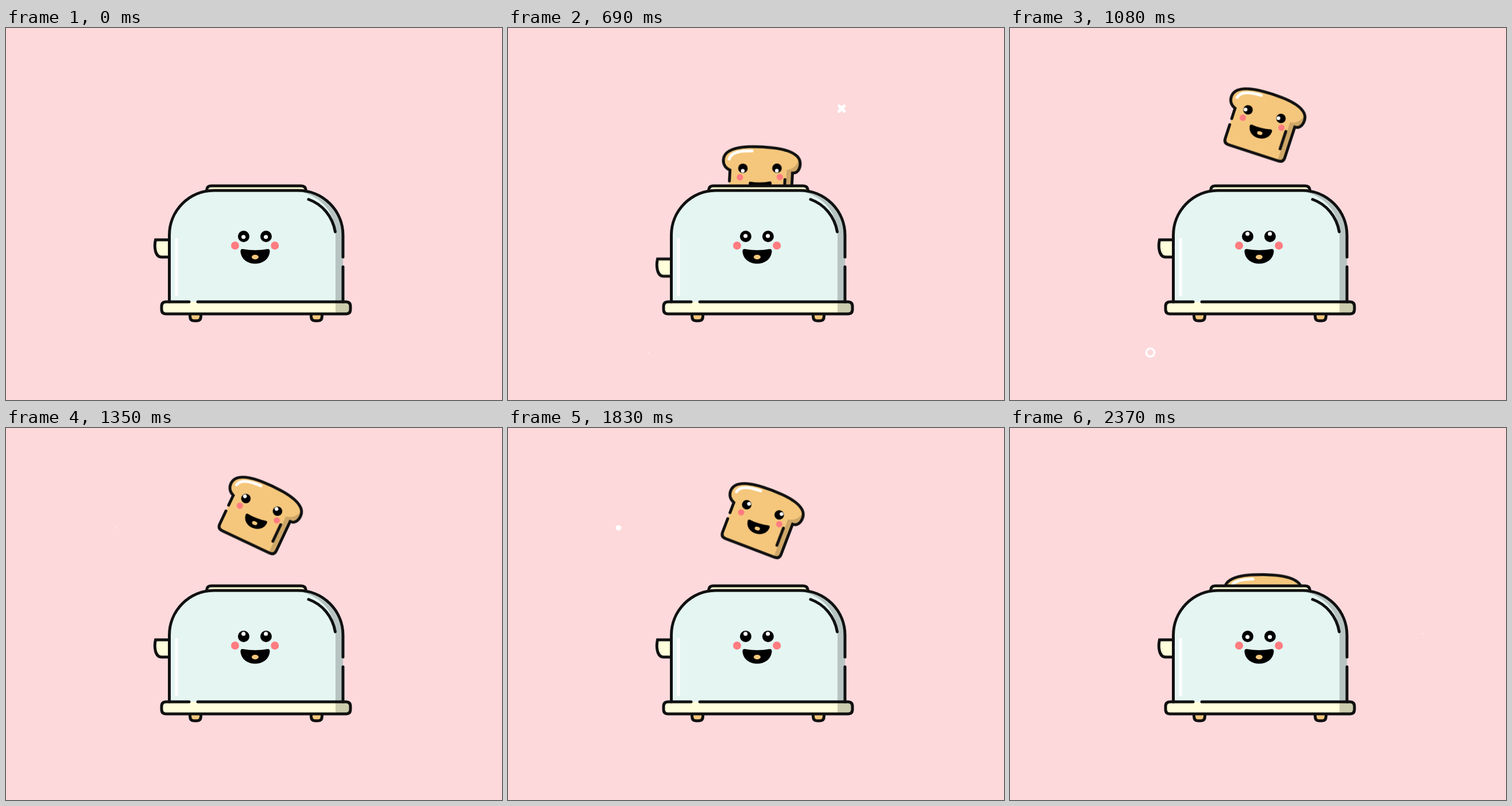
These frames come from a looping animation (864 px wide and 648 px high, 2.4 s). An HTML page:

```html
<!DOCTYPE html>
<html lang="en">
<head>
<meta charset="utf-8">
<title>Toaster</title>
<style>
  html, body { margin: 0; width: 100%; height: 100%; overflow: hidden; background: #fdd9dc; }
  svg { display: block; width: 100%; height: 100%; }
  .line { stroke: #111; stroke-width: 5; stroke-linecap: round; }
  .open { fill: none; }
  .cream { fill: #ffffdb; }
  .crust { fill: #f5c77c; }
  .steel { fill: #e4f5f2; }
  .blush { fill: #ff7c80; }
  .shine { fill: none; stroke: #fff; stroke-width: 5; stroke-linecap: round; }
  .white { fill: #fff; }
</style>
</head>
<body>
<svg viewBox="0 0 864 648">
  <defs>
    <path id="bread" d="M-54.5 8V-11C-63 -14 -67 -21 -67 -28C-67 -46 -45 -54.5 0 -54.5C45 -54.5 67 -46 67 -28C67 -18 62 -12 54.5 -12V44Q54.5 53 45.5 53H-45.5Q-54.5 53 -54.5 44V19"/>
    <clipPath id="crumb"><use href="#bread"/></clipPath>
    <g id="mouth">
      <path d="M-22 -12Q0 -8 22 -12Q26 -12 25.5 -7C24 6 13 13.5 0 13.5C-13 13.5 -24 6 -25.5 -7Q-26 -12 -22 -12Z"/>
      <ellipse class="crust" cy="2" rx="6" ry="4"/>
    </g>
    <path id="foot" class="line crust" d="M320.5 499v3q0 8 7 8h5q7 0 7 -8v-3"/>
  </defs>

  <rect width="864" height="648" fill="#fdd9dc"/>

  <g transform="translate(440.5 0)"><g id="lift"><g id="tilt">
    <use href="#bread" class="crust"/>
    <path clip-path="url(#crumb)" fill-opacity=".16" d="M66 -42C62 -26 56 -19 44 -17V53H70V-42Z"/>
    <use href="#bread" class="line open"/>
    <path class="line" d="M42 0V32"/>
    <path class="shine" d="M-57 -30C-55 -40 -42 -46 -18 -46.5"/>
    <circle class="blush" cx="-36.5" cy=".5" r="5.5"/>
    <circle class="blush" cx="32.8" cy="-3.8" r="5.5"/>
    <g transform="translate(-32.2 -15.3)"><circle r="8.3"/><circle class="white glint" cx="4.4" r="3.3"/></g>
    <g transform="translate(27 -18.8)"><circle r="8.3"/><circle class="white glint" cx="4.4" r="3.3"/></g>
    <use href="#mouth" transform="translate(-.3 15.3) rotate(-4) scale(.78)"/>
  </g></g></g>

  <path id="lever" class="line cream" d="M286 369H260.5C258 380 259 399 271 399H286"/>
  <path class="line cream" d="M349.5 283Q350 275 357 275H514Q522 275 522.5 283"/>
  <use href="#foot"/>
  <use href="#foot" x="211"/>

  <path class="steel" d="M284.5 477V361A78 78 0 0 1 362 283H509A78 78 0 0 1 587 361V477Z"/>
  <path fill-opacity=".2" d="M500 283C545 288 574 318 574 361V477H587V361A78 78 0 0 0 509 283Z"/>
  <rect class="cream" x="271" y="477" width="329" height="21" rx="8"/>
  <path fill-opacity=".2" d="M574 477H592q8 0 8 8v5q0 8 -8 8H574Z"/>
  <path class="line open" d="M284.5 477V361A78 78 0 0 1 362 283H509A78 78 0 0 1 587 361V399M587 416V477"/>
  <path class="line open" d="M334 477H592q8 0 8 8v5q0 8 -8 8H279q-8 0 -8 -8v-5q0 -8 8 -8H319"/>
  <path class="line open" d="M527 298.5C551 307 569 328 573.5 355"/>
  <path class="shine" d="M297 368V465"/>

  <circle class="blush" cx="399" cy="379" r="7"/>
  <circle class="blush" cx="468.3" cy="379" r="7"/>
  <circle cx="414" cy="363" r="10"/>
  <circle cx="453" cy="363" r="10"/>
  <g id="gaze" class="white">
    <circle cx="413.7" cy="364" r="3.6"/>
    <circle cx="452.7" cy="364" r="3.6"/>
  </g>
  <use href="#mouth" x="434" y="397"/>

  <g transform="translate(581.2 140.4)"><path id="cross" class="shine" style="stroke-width:8.5" d="M-7.5 -7.5L7.5 7.5M7.5 -7.5L-7.5 7.5"/></g>
  <g transform="translate(244.4 565.2)"><circle id="ring" class="shine" style="stroke-width:4" r="8.5"/></g>
  <g transform="translate(192.5 174)"><circle id="dotA" class="white" r="1"/></g>
  <g transform="translate(718.8 358.4)"><circle id="dotB" class="white" r="1"/></g>
</svg>
<script>
  const LOOP = 2400;
  const bez = (...p) => `cubic-bezier(${p})`;
  const smooth = bez(.333, 0, .667, 1);
  const start = document.timeline.currentTime;

  // Each step is [time, value, easing towards the next step].
  function run(sel, fn, unit, steps) {
    const frames = steps.map(([t, v, easing = 'linear']) =>
      ({ offset: t / LOOP, transform: `${fn}(${v}${unit})`, easing }));
    for (const el of document.querySelectorAll(sel)) {
      const a = el.animate(frames, { duration: LOOP, iterations: Infinity });
      a.startTime = start;
    }
  }

  run('#lift', 'translateY', 'px', [
    [0, 384.5], [600, 384.5, bez(0, .905, .667, 1)],
    [1500, 148.5, bez(.333, 0, 1, .095)], [LOOP, 384.5]
  ]);
  run('#tilt', 'rotate', 'deg', [
    [0, 0], [600, 0, bez(.167, .167, .667, 1)],
    [1500, 26.7, bez(.333, 0, .833, .833)], [LOOP, 0]
  ]);
  run('.glint', 'rotate', 'deg', [[0, 72], [600, 72], [LOOP, 432]]);
  run('#lever', 'translateY', 'px', [
    [0, 0, smooth], [420, 41.5], [600, 41.5, smooth], [920, 0], [LOOP, 0]
  ]);
  run('#gaze', 'translateY', 'px', [
    [0, 0], [600, 0, smooth], [840, -5.5], [2160, -5.5, smooth], [2360, 0], [LOOP, 0]
  ]);

  run('#cross', 'scale', '', [[0, 0], [250, 0], [590, 1], [850, 0], [LOOP, 0]]);
  run('#ring', 'scale', '', [[0, 0], [630, 0], [1170, 1], [1340, 0], [LOOP, 0]]);
  run('#dotA', 'scale', '', [
    [0, 0], [1320, 0], [1350, 1], [1620, 1], [1860, 5.2], [2040, 0], [LOOP, 0]
  ]);
  run('#dotB', 'scale', '', [[0, 0], [1830, 0], [2070, 3.5], [2220, 5], [2370, 1], [LOOP, 0]]);
</script>
</body>
</html>
```
